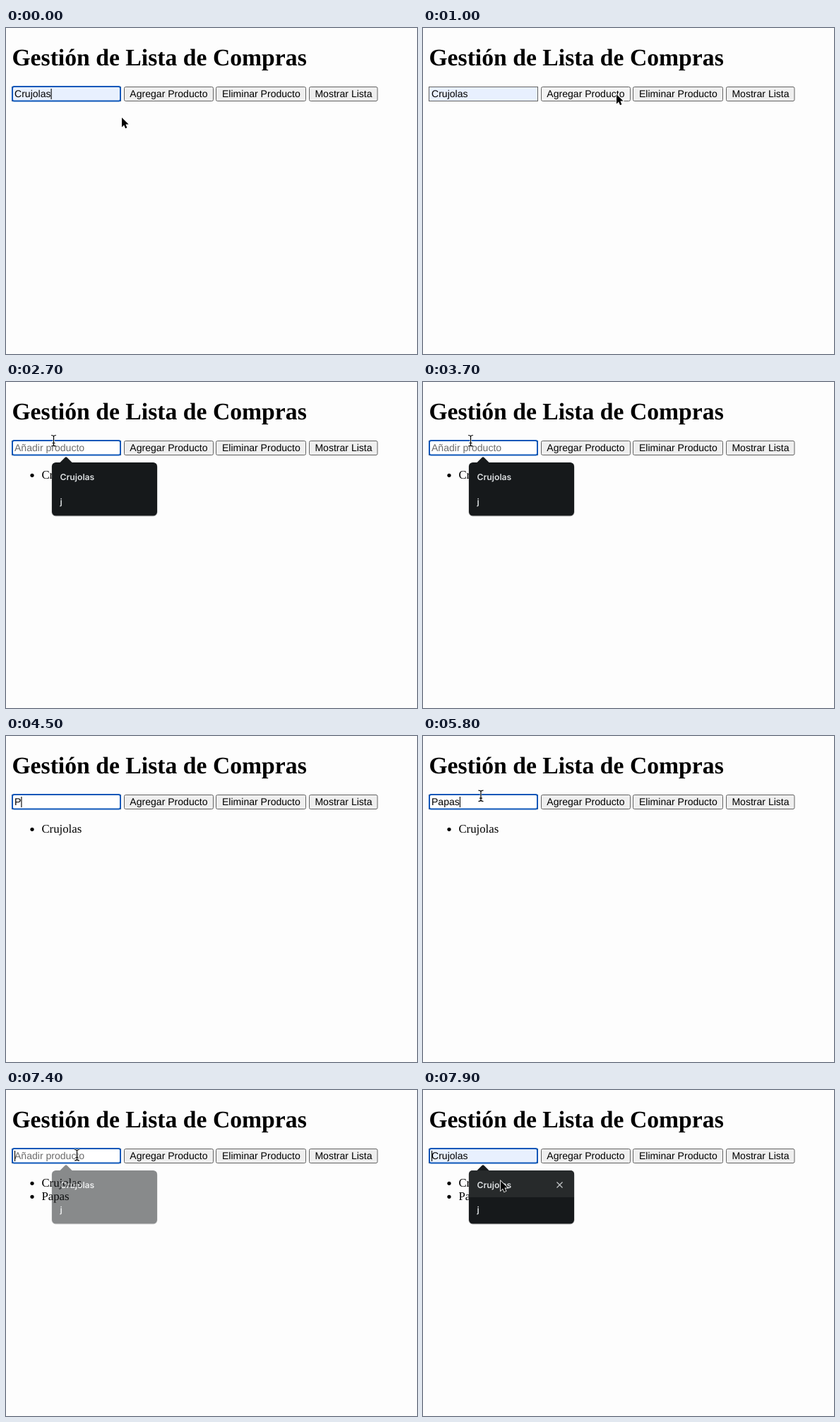
An HTML page for the animation above (8000 ms loop, 582 px wide and 462 px high).

```html
<!DOCTYPE html>
<html lang="es">
<head>
<meta charset="utf-8">
<title>Lista de Compras</title>
<style>
  html, body { margin: 0; width: 100%; height: 100%; overflow: hidden; background: #fdfdfd; }
  svg { display: block; }
  text { white-space: pre; text-rendering: geometricPrecision; }
  .ui { font: 14.05px "Liberation Sans", Arial, sans-serif; }
  .serif { font: 16.8px "Liberation Serif", Times, serif; }
  .title { font: bold 33.7px "Liberation Serif", Times, serif; }
  .menu { font: 600 12.2px Inter, sans-serif; fill: #dcdfe1; }
  .box { stroke: #626262; }
</style>
</head>
<body>
<svg width="582" height="462" viewBox="0 0 582 462">
  <text class="title" x="8.4" y="52.6">Gestión de Lista de Compras</text>

  <rect id="field" class="box" x="8.5" y="83.5" width="154" height="20"/>
  <rect id="focus" x="9" y="83" width="153" height="20.5" rx="2.5" fill="none" stroke="#0c57b9" stroke-width="2"/>
  <text id="value" class="ui" x="12" y="98.3"></text>
  <rect id="caret" y="86" width="1.1" height="15"/>

  <g class="ui" text-anchor="middle">
    <rect id="add" class="box" x="167.5" y="83.5" width="126" height="20" rx="2"/>
    <rect id="remove" class="box" x="297.5" y="83.5" width="127" height="20" rx="2"/>
    <rect id="show" class="box" x="429.5" y="83.5" width="96.5" height="20" rx="2"/>
    <text x="230.4" y="98.3">Agregar Producto</text>
    <text x="361.4" y="98.3">Eliminar Producto</text>
    <text x="478" y="98.3">Mostrar Lista</text>
  </g>

  <g id="item1" class="serif"><circle cx="37" cy="132.3" r="2.6"/><text x="50.4" y="136.7">Crujolas</text></g>
  <g id="item2" class="serif"><circle cx="37" cy="151.3" r="2.6"/><text x="50.4" y="155.8">Papas</text></g>

  <g id="menu">
    <rect x="64.5" y="114.5" width="150" height="76" rx="6" fill="#000" opacity=".25"/>
    <path d="M76 114.5 L83.5 107 Q85 105.5 86.5 107 L94 114.5Z" fill="#16191b"/>
    <rect x="65" y="114" width="149" height="75.5" rx="5.5" fill="#16191b"/>
    <g id="hover">
      <path d="M65 152V119.5Q65 114 70.5 114H208.5Q214 114 214 119.5V152Z" fill="#272a2b"/>
      <path d="M189.5 130.5l8 8m0-8l-8 8" stroke="#c3c6c8" stroke-width="1.2"/>
    </g>
    <text class="menu" x="76.5" y="139.4">Crujolas</text>
    <text class="menu" x="76.5" y="174">j</text>
  </g>

  <g id="pointer">
    <path id="arrow" d="M0 0V13.4L3.1 10.5L5.1 15.2L7.4 14.2L5.4 9.6H9.6Z" stroke="#fff" stroke-width="1.6" paint-order="stroke"/>
    <g id="beam" fill="none">
      <path d="M-3-7.5Q0-7.5 .5-6Q1-7.5 4-7.5M.5-6V6.5M-3 8Q0 8 .5 6.5Q1 8 4 8M-1.5 3.5H2.5" stroke="#fff" stroke-width="2.6" opacity=".8"/>
      <path d="M-3-7.5Q0-7.5 .5-6Q1-7.5 4-7.5M.5-6V6.5M-3 8Q0 8 .5 6.5Q1 8 4 8M-1.5 3.5H2.5" stroke="#000" stroke-width="1.2"/>
    </g>
  </g>
</svg>
<script>
const LOOP = 8000, STEP = 100;
const $ = id => document.getElementById(id);
const show = (id, on) => $(id).style.display = on ? '' : 'none';
const within = (t, ...spans) => spans.some(([from, to]) => t >= from && t < to);

// [time, x, y]
const pointerPath = [
  [0, 164, 127], [500, 274, 94], [1200, 274, 94], [1800, 85, 92], [2000, 67, 83],
  [5700, 67, 83], [6200, 206, 98], [6800, 206, 98], [7300, 100, 92], [7500, 100, 92], [7900, 110, 129]
];
// [time, text]
const typing = [
  [0, 'Crujolas'], [1200, ''], [3800, 'p'], [4100, ''], [4500, 'P'], [5000, 'Pa'],
  [5200, 'Pap'], [5300, 'Papa'], [5400, 'Papas'], [6600, ''], [7800, 'Crujolas']
];

function pointerAt(t) {
  const i = pointerPath.findIndex(key => key[0] > t);
  if (i < 0) return pointerPath.at(-1).slice(1);
  const [t0, x0, y0] = pointerPath[i - 1], [t1, x1, y1] = pointerPath[i];
  const p = (t - t0) / (t1 - t0), k = p * p * (3 - 2 * p);
  return [x0 + (x1 - x0) * k, y0 + (y1 - y0) * k];
}

function render(t) {
  const [x, y] = pointerAt(t);
  const overRow = y >= 82 && y <= 104;
  const overField = overRow && x >= 8 && x <= 163;
  const overAdd = overRow && x >= 167 && x <= 294;
  const pressed = within(t, [1000, 1200], [6400, 6600]);
  const preview = t >= 7800;
  const text = typing.findLast(key => key[0] <= t)[1];

  $('field').setAttribute('fill', t < 1200 || preview ? '#e8f0fe' : '#fff');
  show('focus', within(t, [0, 1000], [2200, 6400], [7400, LOOP]));

  const value = $('value');
  value.textContent = text || 'Añadir producto';
  value.setAttribute('fill', text ? '#000' : '#6c6c6c');
  const end = text && !preview ? value.getComputedTextLength() : 0;
  $('caret').setAttribute('x', 12 + end);
  show('caret', within(t, [0, 200], [700, 1000], [2200, 2700], [3200, 3700],
    [3800, 4300], [4500, 5900], [7400, LOOP]));

  for (const id of ['add', 'remove', 'show']) $(id).setAttribute('fill', '#efefef');
  if (overAdd) $('add').setAttribute('fill', pressed ? '#f3f3f3' : '#e8e8e8');

  show('item1', t >= 1200);
  show('item2', t >= 6600);

  show('menu', within(t, [2200, 3900], [7400, LOOP]));
  $('menu').style.opacity = within(t, [2200, 2300], [3800, 3900], [7400, 7500]) ? .5 : 1;
  show('hover', preview);

  show('pointer', !within(t, [3800, 5800]));
  show('arrow', !overField);
  show('beam', overField);
  $('pointer').setAttribute('transform', `translate(${x} ${y})`);
}

function tick() {
  render(Math.floor(performance.now() % LOOP / STEP) * STEP);
  requestAnimationFrame(tick);
}
tick();
</script>
</body>
</html>
```
